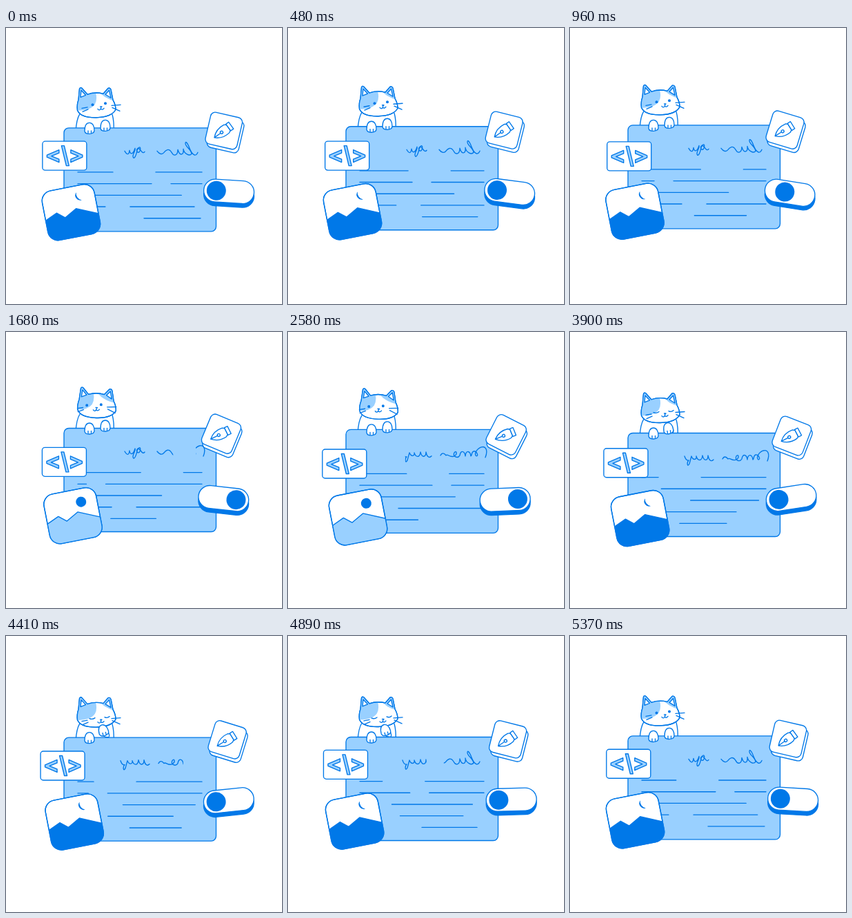
An HTML page for the animation above (5.4 s loop, 400 px wide and 400 px high).

```html
<!DOCTYPE html>
<html lang="en">
<head>
<meta charset="utf-8">
<title>Cat with interface card</title>
<style>
  html, body { margin: 0; width: 100%; height: 100%; overflow: hidden; background: #fff; }
  svg { display: block; width: 100vw; height: 100vh; }
  .ink { stroke: #0078e8; stroke-width: 1.35; stroke-linecap: round; stroke-linejoin: round; fill: none; }
  .white { fill: #fff; }
  .light { fill: #99d0ff; }
  .blue { fill: #0078e8; }
  .plain { stroke: none; }
</style>
</head>
<body>
<svg viewBox="0 0 400 400" class="ink">
  <defs>
    <path id="headShape" d="M105 104L106.500 88Q107.500 85 110 87L118 96Q129 92 141 95L148 87Q151 86 152 89L155 104Q159 111 159 118Q153 129 131 129.500Q108 130 103.500 119Q102.500 111 105 104Z"/>
    <clipPath id="headClip"><use href="#headShape"/></clipPath>
    <clipPath id="tileClip"><rect x="-38.500" y="-36.500" width="77" height="73" rx="15"/></clipPath>
    <clipPath id="clipA"><rect id="windowA" y="150" height="50"/></clipPath>
    <clipPath id="clipB"><rect id="windowB" y="150" height="50"/></clipPath>
    <path id="peaks" d="M-39 5L-21-3-10 6 8-4 39 9.500V37H-39Z"/>
    <g id="paw">
      <path class="white" d="M-7 4C-7-4-4-8 0-8S7-4 7 3C7 9-6 10-7 4Z"/>
      <path d="M-2 7V3.500M2.500 7V3.500"/>
    </g>
  </defs>

  <g id="stage">
    <path class="white" d="M107 124Q102 132 101 150H156Q157 136 154 125"/>
    <g id="head">
      <use href="#headShape" class="white"/>
      <g clip-path="url(#headClip)">
        <g id="patches" class="light plain">
          <path d="M96 84H127Q134 101 129 110Q122 121 96 119Z"/>
          <path d="M134 90Q142 104 166 107V84H140Z"/>
        </g>
      </g>
      <use href="#headShape"/>
      <path class="white" d="M108 100L109 90 115.500 97ZM144 96L149.500 90 152 101Z"/>
      <g id="face">
        <g class="blue plain open">
          <circle id="leftEye" cx="125.500" cy="111" r="2"/><circle cx="144" cy="109" r="2"/>
        </g>
        <path id="closedEyes" d="M121 112Q125 114 129 111M143 110Q147 112 150 109"/>
        <path d="M136.500 113.500H139L137.500 115V117M133 117Q135 120 137.500 117Q140 119 142 116"/>
        <path d="M110 116L118 114.500M111 121L119 117.500M153 112L166 111M154 115L165 120"/>
      </g>
    </g>
    <rect class="light" x="84" y="144.500" width="220.500" height="150" rx="7"/>
    <use href="#paw" x="121" y="145"/>
    <path id="forearm" class="white"/>
    <use id="rightPaw" href="#paw"/>
    <path id="rows"/>
    <path clip-path="url(#clipA)" d="M278 180C275 187 270 184 266 174C263 166 260 163 260 167C260 172 268 175 269 182C266 186 258 182 257 175C258 184 252 186 249 176C249 185 243 186 240 180C236 173 231 177 229 180C226 184 222 182 219 178M201 179C197 184 195 173 191 174C187 177 192 183 194 178C196 172 193 170 190 177C188 188 184 191 184 185C185 179 188 178 187 174C184 184 180 183 179 177C178 185 175 183 172 178"/>
    <path clip-path="url(#clipB)" d="M286 185C290 175 287 168 280 170C274 172 269 180 273 183C277 183 273 175 269 176C265 178 267 183 265 183C264 175 258 174 257 183C256 175 250 174 249 182C246 187 238 184 241 178C244 174 246 180 241 183C235 186 231 179 229 182C226 178 223 178 221 182M208 183C204 187 201 183 200 177C200 185 194 186 192 177C191 186 185 185 183 178C184 184 178 184 176 178L173 189C170 195 169 187 172 184C168 185 167 181 166 178"/>
  </g>

  <g id="code">
    <rect class="white" x="-32" y="-21" width="64" height="42" rx="4"/>
    <path class="light" d="M-8-8.500V-4L-19 .5-8 5V9.500L-25.500 2V-1ZM9-8.500V-4L20 .5 9 5V9.500L26 2V-1ZM-4.500-14.500H-.5L6.500 14.500H2.500Z"/>
  </g>

  <g id="picture">
    <rect class="white" x="-38.500" y="-36.500" width="77" height="73" rx="15"/>
    <g clip-path="url(#tileClip)">
      <g id="day"><use href="#peaks" class="light"/><circle class="blue plain" cx="15.400" cy="-17.500" r="7.500"/></g>
      <g id="night"><use href="#peaks" class="blue"/><path class="blue plain" d="M12.600-27A7.300 7.300 0 0 0 18.500-14.500A10 10 0 0 1 12.600-27Z"/></g>
    </g>
    <rect x="-38.500" y="-36.500" width="77" height="73" rx="15"/>
  </g>

  <g id="pen">
    <rect class="white" x="-20" y="-19" width="47" height="47" rx="7"/>
    <rect class="white" x="-23.500" y="-23.500" width="47" height="47" rx="7"/>
    <g transform="rotate(-49)">
      <path class="white" d="M-17 0Q-8-9 5-7L8-5V5L5 7Q-8 9-17 0H-6"/>
      <path class="white" d="M8-6H13V6H8Z"/>
      <circle class="white" cx="-4" cy="0" r="2"/>
    </g>
  </g>

  <g id="toggle">
    <rect id="toggleBase" class="blue" x="-36.500" y="-16.500" width="73" height="33" rx="16.500"/>
    <rect class="white" x="-36.500" y="-16.500" width="73" height="33" rx="16.500"/>
    <circle id="knob" class="blue plain" r="14"/>
  </g>
</svg>

<script>
const LOOP = 5400;
const TEXT_LEFT = 104, TEXT_RIGHT = 284;
const $ = id => document.getElementById(id);
const set = (id, name, value) => $(id).setAttribute(name, value);
const move = (id, x, y, turn = 0) => set(id, 'transform', `translate(${x} ${y}) rotate(${turn})`);
const clamp = (v, low = 0, high = 1) => Math.min(high, Math.max(low, v));
const ease = u => u < .5 ? 4 * u ** 3 : 1 - (2 - 2 * u) ** 3 / 2;
const ramp = (t, start, length) => ease(clamp((t - start) / length));
const pulse = (t, up, down, length) => ramp(t, up, length) - ramp(t, down, length);
const wave = (t, mid, size, peak) => mid + size * Math.cos(2 * Math.PI * (t - peak) / LOOP);
const openEyes = document.querySelector('.open');

// A text row from start to end, broken by an optional gap.
function textRow(index, start, end, gapMid = start, gap = 0) {
  const y = 208.6 + 16.7 * index;
  const line = (from, to) => {
    const a = clamp(from, TEXT_LEFT, TEXT_RIGHT), b = clamp(to, TEXT_LEFT, TEXT_RIGHT);
    return b - a > 1 ? `M${a} ${y}H${b}` : '';
  };
  return line(start, gapMid - gap / 2) + line(gapMid + gap / 2, end);
}

function drawRows(t) {
  set('rows', 'd', [
    textRow(0, TEXT_LEFT, TEXT_RIGHT, wave(t, 192, 35, 1500), 62),
    textRow(1, TEXT_LEFT, TEXT_RIGHT, wave(2 * t, 170, 55, 0), 28),
    textRow(2, wave(t, 125, 50, 4000), wave(t, 250, 25, 4200)),
    textRow(3, TEXT_LEFT, wave(t, 275, 35, 1400), wave(t, 150, 30, 1000), 36),
    textRow(4, wave(t, 165, 35, 0), wave(t, 235, 47, 0))
  ].join(''));
}

// Each phrase is written, then wiped, from right to left.
function drawWriting(t) {
  const sweep = (start, speed = .117) => clamp(288 - (t - start) * speed, 155, 292);
  const reveal = (id, left, right) => {
    set(id, 'x', left);
    set(id, 'width', Math.max(0, right - left));
  };
  if (t < 4430) reveal('windowA', 155, sweep(1290));
  else reveal('windowA', sweep(4430, .135), 292);
  reveal('windowB', sweep(1570), sweep(4145));
}

function drawCat(t) {
  const front = pulse(t, 1150, 2750, 400);
  const lick = pulse(t, 3750, 4850, 300);
  const bob = lick * Math.sin(t / 90);
  set('head', 'transform', `rotate(${3 * front} 131 125)`);
  move('patches', -5 * front, 0);
  move('face', -7 * front, front + 5 * lick);
  set('leftEye', 'cx', 125.5 - 2 * front);
  openEyes.setAttribute('visibility', lick > .5 ? 'hidden' : 'visible');
  set('closedEyes', 'visibility', lick > .5 ? 'visible' : 'hidden');
  const x = 144 - 3 * lick, y = 141 - 6 * lick + bob;
  set('forearm', 'd', lick > .05 ? `M${x - 5} ${y + 4}Q142 145 149 144Q151 142 ${x + 6} ${y}` : '');
  move('rightPaw', x, y, -15 * lick);
}

function drawToggle(t) {
  const tilt = wave(t, 0, 9, 1000);
  move('toggle', wave(t, 319, 4.7, 4950), wave(t, 239.8, 3, 2620), tilt);
  set('toggleBase', 'transform', `rotate(${-tilt}) translate(0 5.5) rotate(${tilt})`);
  set('knob', 'cx', -18.3 + 36.6 * pulse(t, 772, 3206, 450));
}

function drawPicture(t) {
  const daylight = pulse(t, 1000, 3430, 200);
  move('picture', wave(t, 98.2, 4.7, 3250), wave(t, 267.9, 2.2, 3750), -11);
  set('day', 'opacity', daylight);
  set('night', 'opacity', 1 - daylight);
}

function render(t) {
  move('stage', 0, wave(t, -1.2, 3.8, 4400));
  drawCat(t);
  drawRows(t);
  drawWriting(t);
  move('code', wave(t, 83.2, 2.6, 750), wave(t, 188.2, 3.2, 3000));
  drawPicture(t);
  move('pen', wave(t, 316.3, 5, 3950), wave(t, 149, 1.5, 4000), wave(t, 20, 7, 2700));
  drawToggle(t);
}

const began = performance.now();
function tick() {
  render((performance.now() - began) % LOOP);
  requestAnimationFrame(tick);
}
tick();
</script>
</body>
</html>
```
